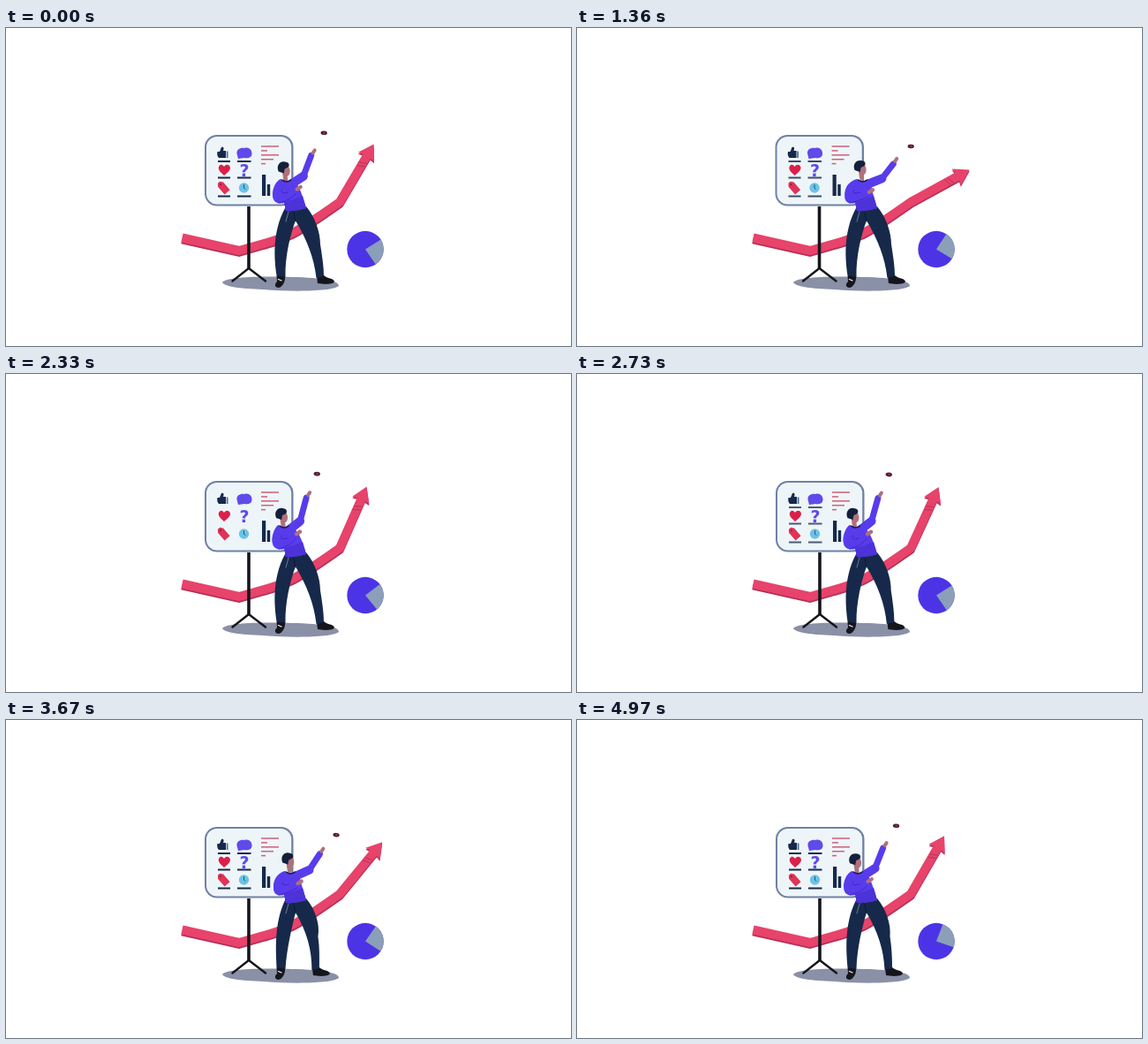
Write an HTML page with a canvas that moves like this. It is 640 px wide and 360 px high and loops after 5 s.

```html
<!DOCTYPE html>
<html lang="en">
<head>
<meta charset="utf-8">
<title>Bending the trend</title>
<style>
  html, body { margin: 0; width: 100%; height: 100%; overflow: hidden; background: #fff; }
  canvas { display: block; }
</style>
</head>
<body>
<canvas id="stage" width="640" height="360"></canvas>
<script>
const LOOP = 5000;
const ctx = document.getElementById('stage').getContext('2d');
const NAVY = '#16294a', PURPLE = '#583cec', FOLD = '#4329c4', PINK = '#e7436b',
      SKIN = '#b0707b', BLACK = '#15151d';
const BEND = { x: 378, y: 197 };

// Tracks of [time, value], joined by smooth curves
const pull = [[0, .3], [200, .25], [860, .85], [1250, .98], [1800, .65], [2330, .01],
  [2450, -.04], [2870, .13], [3130, .4], [3930, .96], [4370, 1], [4970, .35], [5000, .31]];
const swing = [[0, -59.5], [200, -60], [700, -39.5], [860, -36.7], [1250, -27.5], [1800, -44.7],
  [2330, -66.2], [2450, -67], [2870, -64], [3130, -60], [3930, -47], [4370, -45.8], [4970, -60], [5000, -60]];
const spin = [[0, -32], [860, -51], [1250, -57], [1800, -51], [2330, -37], [3130, -31],
  [4370, -90], [4970, -69], [5000, -67]];
const step = [[0, 0], [2330, 0], [3130, -2], [4370, -8], [4970, -3], [5000, -2]];

function track(keys, t) {
  let i = 0;
  while (i < keys.length - 2 && t >= keys[i + 1][0]) i++;
  const slope = k => {
    const a = keys[Math.max(k - 1, 0)], b = keys[Math.min(k + 1, keys.length - 1)], c = keys[k];
    if ((c[1] - a[1]) * (b[1] - c[1]) <= 0) return 0;
    return (b[1] - a[1]) / (b[0] - a[0]);
  };
  const [t0, v0] = keys[i], [t1, v1] = keys[i + 1], d = t1 - t0, u = (t - t0) / d;
  const u2 = u * u, u3 = u2 * u;
  return v0 * (2 * u3 - 3 * u2 + 1) + v1 * (3 * u2 - 2 * u3) +
    d * (slope(i) * (u3 - 2 * u2 + u) + slope(i + 1) * (u3 - u2));
}

const bump = (t, mid, half) => {
  const u = Math.abs(t - mid) / half;
  return u < 1 ? (1 + Math.cos(Math.PI * u)) / 2 : 0;
};

const along = (angle, r) => ({ x: BEND.x + r * Math.cos(angle), y: BEND.y + r * Math.sin(angle) });

function fill(d, color) {
  ctx.fillStyle = color;
  ctx.fill(new Path2D(d));
}

function line(d, color, width, cap = 'round') {
  ctx.strokeStyle = color;
  ctx.lineWidth = width;
  ctx.lineCap = cap;
  ctx.lineJoin = cap === 'round' ? 'round' : 'miter';
  ctx.stroke(new Path2D(d));
}

function oval(x, y, rx, ry, color, turn = 0) {
  ctx.fillStyle = color;
  ctx.beginPath();
  ctx.ellipse(x, y, rx, ry, turn, 0, 7);
  ctx.fill();
}

function moved(x, y, turn, paint) {
  ctx.save();
  ctx.translate(x, y);
  ctx.rotate(turn);
  paint();
  ctx.restore();
}

function panel(x, y, w, h, r, color) {
  ctx.fillStyle = color;
  ctx.beginPath();
  ctx.roundRect(x, y, w, h, r);
  ctx.fill();
}

function board(ruled) {
  panel(225, 121, 100.5, 80.5, 14, '#6f80a4');
  panel(227, 123, 96.2, 76.5, 12, '#eef5f9');

  // Thumb, speech bubble, heart, question mark, tag, clock
  fill('M239.5 140H242L244 135C247 134 247 137 246 139H249V147H241C239 145 239 142 239.5 140Z', NAVY);
  fill('M249.7 139.5H251.5V147H249.7Z', '#50709a');
  fill('M261.5 142C261 137 266 135 270 136C276 134 279 139 278.5 143C278 147 274 148 270 147L263 148Z', '#604aea');
  fill('M247 167C243 163 240 161 241 157C243 153 246 155 247 157C249 154 253 154 254 158C254 162 250 164 247 167Z', '#dc1f49');
  ctx.fillStyle = '#604aea';
  ctx.font = 'bold 19px "DejaVu Sans", sans-serif';
  ctx.textAlign = 'center';
  ctx.fillText('?', 270, 167.5);
  moved(246, 180.5, -.72, () => {
    fill('M-4 -4.5L-1.5 -7.5H1.5L4 -4.5V7H-4Z', '#df3358');
    oval(0, -4.5, 1, 1, '#7c1e3c');
  });
  oval(269.5, 181, 5.7, 5.7, '#6cc3e6');
  line('M269.5 177.5V181L271 182.5', '#24557c', 1);

  ctx.globalAlpha = ruled;
  for (const y of [151, 169.5, 190.5]) line(`M240 ${y}H254M262 ${y}H277.5`, NAVY, 1.8, 'butt');
  ctx.globalAlpha = 1;

  [20, 7, 20, 14, 5].forEach((w, i) => line(`M289 ${134 + i * 4.9}h${w}`, '#cd6079', 1.5, 'butt'));
  fill('M290 166h4.2v24h-4.2ZM295.8 177h3.4v13h-3.4Z', NAVY);
}

function stand() {
  line('M275 202V272', BLACK, 3.6, 'butt');
  line('M256.5 286.5L275 272L294 286.5', BLACK, 2.4);
}

function arrow(turn) {
  const neck = along(turn, 61);
  const shaft = `M199.5 237.5L264 252L292 244Q308 240 322 233Q334 228 ${BEND.x} ${BEND.y}L${neck.x} ${neck.y}`;
  const layer = (color, dy) => {
    ctx.save();
    ctx.translate(0, dy);
    line(shaft, color, 10, 'butt');
    moved(BEND.x, BEND.y, turn, () => fill('M60 -5L59 -10.5L76 0L59 10.5L60 5Z', color));
    ctx.restore();
  };
  layer('#b32f57', 1.8);
  layer(PINK, 0);
  moved(BEND.x, BEND.y, turn, () => {
    ctx.globalAlpha = .45;
    line('M46 -4L49 4M50 -4L53 4', '#6b1d38', .8);
    ctx.globalAlpha = 1;
  });
}

function pie(start) {
  const a = start * Math.PI / 180;
  oval(407, 250.5, 20.7, 20.7, '#4c34e6');
  ctx.fillStyle = '#8b9fb8';
  ctx.beginPath();
  ctx.moveTo(407, 250.5);
  ctx.arc(407, 250.5, 20.7, a, a + 1.53);
  ctx.fill();
}

function man(p, d, hand) {
  const hx = 311 + 9 * p, hy = 159 - 2 * p, s = 2 * p, k = -.4 * d;
  const elbow = `${333 + 13 * p} ${166.5 + 4 * p}`;
  const wrist = `${hand.x - 3} ${hand.y + 5}`;
  const nearX = 331 + s, nearY = 179 + 5 * p;

  // Legs and shoes
  fill('M306.5 280H316C317 287 313 293 309 294C304 294 304 290 307 287Z', BLACK);
  line('M308.5 284.5L312 286', '#f4f4f8', 1.3);
  fill(`M${352 + d} 281L${360 + d} 280C${364 + d} 284 ${371 + d} 283 ${372 + d} 287C${370 + d} 291 ${358 + d} 290 ${353 + d} 289Z`, BLACK);
  fill(`M316 204L340 202C350 214 356 231 ${356 + d / 2} 245C${358 + d / 2} 258 ${360 + d} 270 ${360 + d} 281L${351.5 + d} 283C${349 + d / 2} 260 341 240 328 218C${322 + k} 234 ${316 + k} 258 316.5 282L306.5 280C${304 + k} 262 ${301 + k} 232 316 204Z`, NAVY);
  line('M320 208L317 219', '#7f90b4', .8);
  line('M328 219L326 209', '#0c1934', 1);

  // Far arm
  line(`M${hx + 9} 177L${elbow}`, PURPLE, 10);
  line(`M${elbow}L${wrist}`, PURPLE, 7);
  line(`M${hand.x - 1} ${hand.y + 2}L${hand.x + 1} ${hand.y - 1}`, SKIN, 4);

  // Head
  line(`M${hx + 2} ${hy + 6}L${hx + 3} ${hy + 13}`, SKIN, 5);
  oval(hx + 4, hy + 3.5, 4, 6, SKIN);
  fill(`M${hx - 5} ${hy + 4}C${hx - 8} ${hy - 3} ${hx - 3} ${hy - 8} ${hx + 2} ${hy - 7}C${hx + 7} ${hy - 7} ${hx + 8} ${hy - 3} ${hx + 6} ${hy - 1}L${hx + 2} ${hy + 1}L${hx + 1} ${hy + 6}Z`, '#14203a');

  // Sweater and near arm
  fill(`M${hx - 3} 171C${304 + s} 174 ${300.5 + s} 184 ${301.5 + s} 190C303 197 308 200 315 198L317 207Q329 208 340 204C338 196 335 188 ${332 + s} 182L${hx + 13} 171Q${hx + 5} 175 ${hx - 3} 171Z`, PURPLE);
  fill('M315 197Q326 195 336 190L340 204Q329 208 317 207Z', '#4c32d9');
  line(`M${hx - 1} 172Q${hx + 4} 176 ${hx + 9} 172`, '#1b1f45', 1.6);
  line(`M${308 + s} 181Q${303 + s} 196 312 193Q322 190 ${nearX - 6} ${nearY + 4}`, PURPLE, 9);
  line(`M${312 + s} 183Q310 189 ${319 + s} 186M309 198Q322 195 ${nearX - 3} ${nearY + 7}`, FOLD, 1);
  line(`M${nearX - 2} ${nearY + 2}L${nearX + 2} ${nearY - .5}`, SKIN, 4.4);
}

function rope(t, hand, ring, turn) {
  const first = bump(t, 1800, 420), second = bump(t, 4370, 420);
  const knot = along(turn - .11, 55);
  const cut = { x: ring.x + (knot.x - ring.x) * .3, y: ring.y + (knot.y - ring.y) * .3 };
  ctx.globalAlpha = Math.max(first, second);
  fill(`M${hand.x} ${hand.y}L${ring.x} ${ring.y}L${knot.x} ${knot.y}L${BEND.x} ${BEND.y}L338 177Z`, '#f9f9fa');
  ctx.globalAlpha = first;
  line(`M${hand.x} ${hand.y}L${ring.x} ${ring.y}L${knot.x} ${knot.y}`, '#30303a', .9);
  ctx.globalAlpha = second;
  line(`M${cut.x} ${cut.y}L${knot.x} ${knot.y}`, '#3d4a52', .9);
  ctx.globalAlpha = 1;
}

function draw(t) {
  // Two short rests in the motion
  if (t > 30 && t < 200) t = 30;
  if (t > 3930 && t < 4070) t = 3930;

  const p = track(pull, t), turn = track(swing, t) * Math.PI / 180;
  const hand = { x: 343 + 19 * p, y: 135 + 14.5 * p };
  const ring = { x: 352 + 27.3 * p, y: 113 + 18 * p + 4 * p * p };
  const shift = -8 * bump(t, 1800, 520);
  const ruled = 1 - Math.min(1, bump(t, 1800, 600) + bump(t, 2330, 600));

  ctx.clearRect(0, 0, 640, 360);
  fill('M245 288C252 280 310 281 348 283C370 285 377 288 377 292C370 298 328 299 291 296C265 295 248 293 245 288Z', '#8a90a6');
  moved(shift, 0, 0, () => board(ruled));
  rope(t, hand, ring, turn);
  arrow(turn);
  moved(shift, 0, 0, stand);
  pie(track(spin, t));
  man(p, track(step, t), hand);
  oval(ring.x, ring.y, 3.7, 2.3, '#48202e', .1);
  oval(ring.x + .3, ring.y, 1.5, 1.1, '#a52f4b');
}

const start = performance.now();
function tick() {
  draw((performance.now() - start) % LOOP);
  requestAnimationFrame(tick);
}
tick();
</script>
</body>
</html>
```
